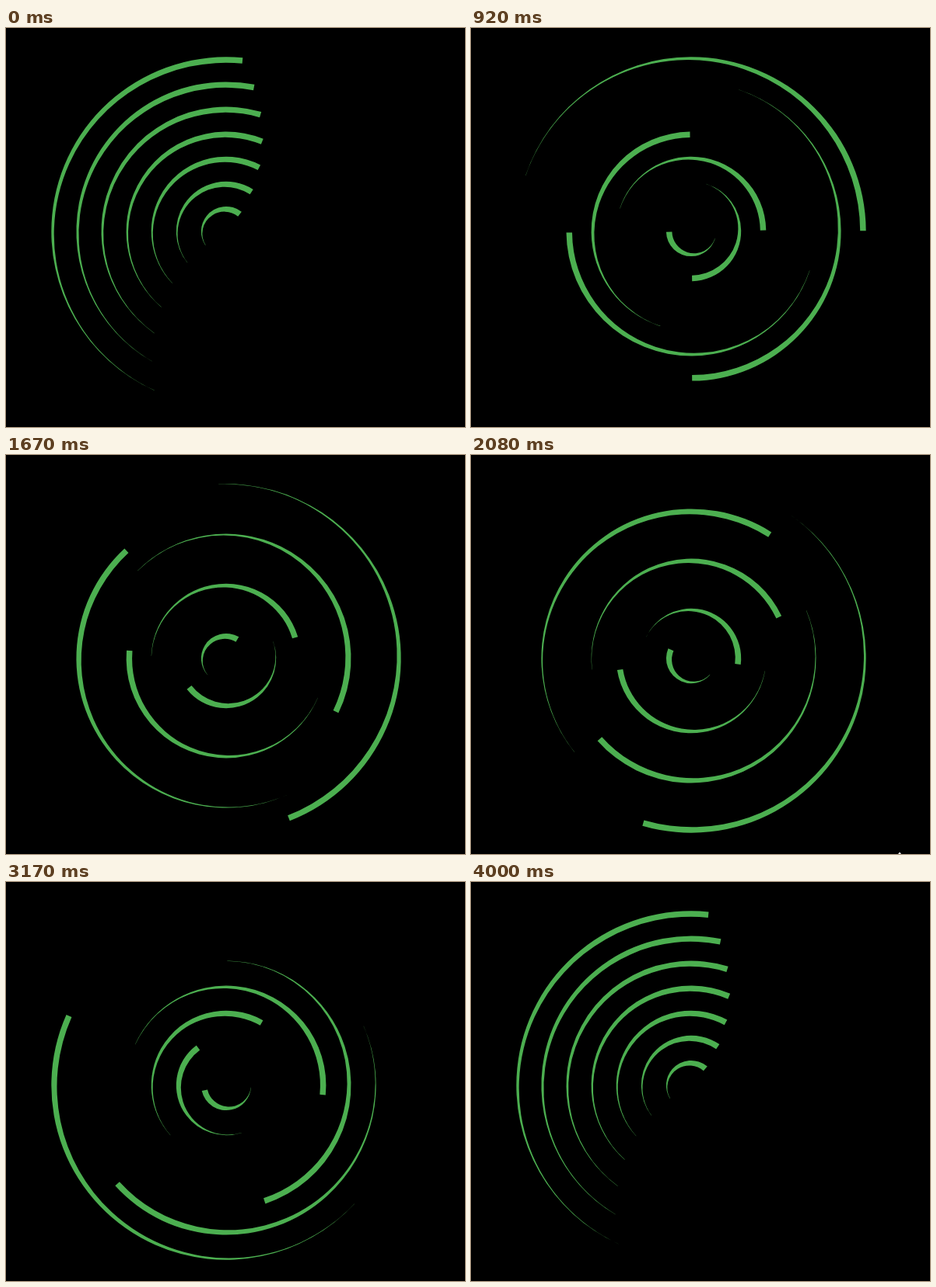
These frames come from a looping animation (590 px wide and 514 px high, 4080 ms). An HTML page with a canvas:

```html
<!DOCTYPE html>
<html lang="en">
<head>
<meta charset="utf-8">
<title>Concentric arcs</title>
<style>
html, body { margin: 0; width: 590px; height: 514px; overflow: hidden; background: #000; }
canvas { display: block; }
</style>
</head>
<body>
<canvas id="stage" width="590" height="514"></canvas>
<script>
const ctx = document.getElementById('stage').getContext('2d');
const LOOP = 4080, FPS = 12, RINGS = 7, GAP = 32.1, WIDTH = 7.5;
const rad = deg => deg * Math.PI / 180;

// Slightly uneven rotation: [step, degrees] for the slowest ring
const PHASE = [[0, 5.45], [5, 43.3], [16, 128.6], [25, 196.2], [32, 247.3], [38, 293.9], [48, 365.75]];

function phaseAt(step) {
  const i = Math.max(1, PHASE.findIndex(([s]) => s >= step));
  const [s0, a0] = PHASE[i - 1], [s1, a1] = PHASE[i];
  return a0 + (a1 - a0) * (step - s0) / (s1 - s0);
}

// Half ring between two touching circles: blunt head, vanishing tail
function drawArc(radius, angle) {
  const head = rad(-90), tail = rad(-90 - 161), shift = WIDTH / 2;
  ctx.save();
  ctx.translate(283, 262);
  ctx.rotate(rad(angle));
  ctx.beginPath();
  ctx.arc(0, 0, radius, head, tail, true);
  ctx.arc(0, shift, radius - shift, tail, head);
  ctx.fill();
  ctx.restore();
}

// Small pointer sliding along the bottom edge
function drawPointer(step) {
  const p = (step - 25) / 7;
  if (p < 0 || p > 1) return;
  const x = 551 - 157 * p, y = 511.5 - 5.5 * p;
  ctx.fillStyle = '#fff';
  ctx.beginPath();
  ctx.moveTo(x, y);
  ctx.lineTo(x + 4, y + 5);
  ctx.lineTo(x - 4, y + 5);
  ctx.fill();
  ctx.fillRect(x - 1, y + 5, 2, 6);
}

function draw(now) {
  const step = Math.min(48, Math.floor((now % LOOP + 3.4) * FPS / 1000));
  const phase = phaseAt(step);
  ctx.clearRect(0, 0, 590, 514);
  ctx.fillStyle = '#4caf50';
  for (let k = 1; k <= RINGS; k++) drawArc(GAP * (RINGS + 1 - k), phase * k);
  drawPointer(step);
}

const start = performance.now();
(function tick() {
  draw(performance.now() - start);
  requestAnimationFrame(tick);
})();
</script>
</body>
</html>
```
